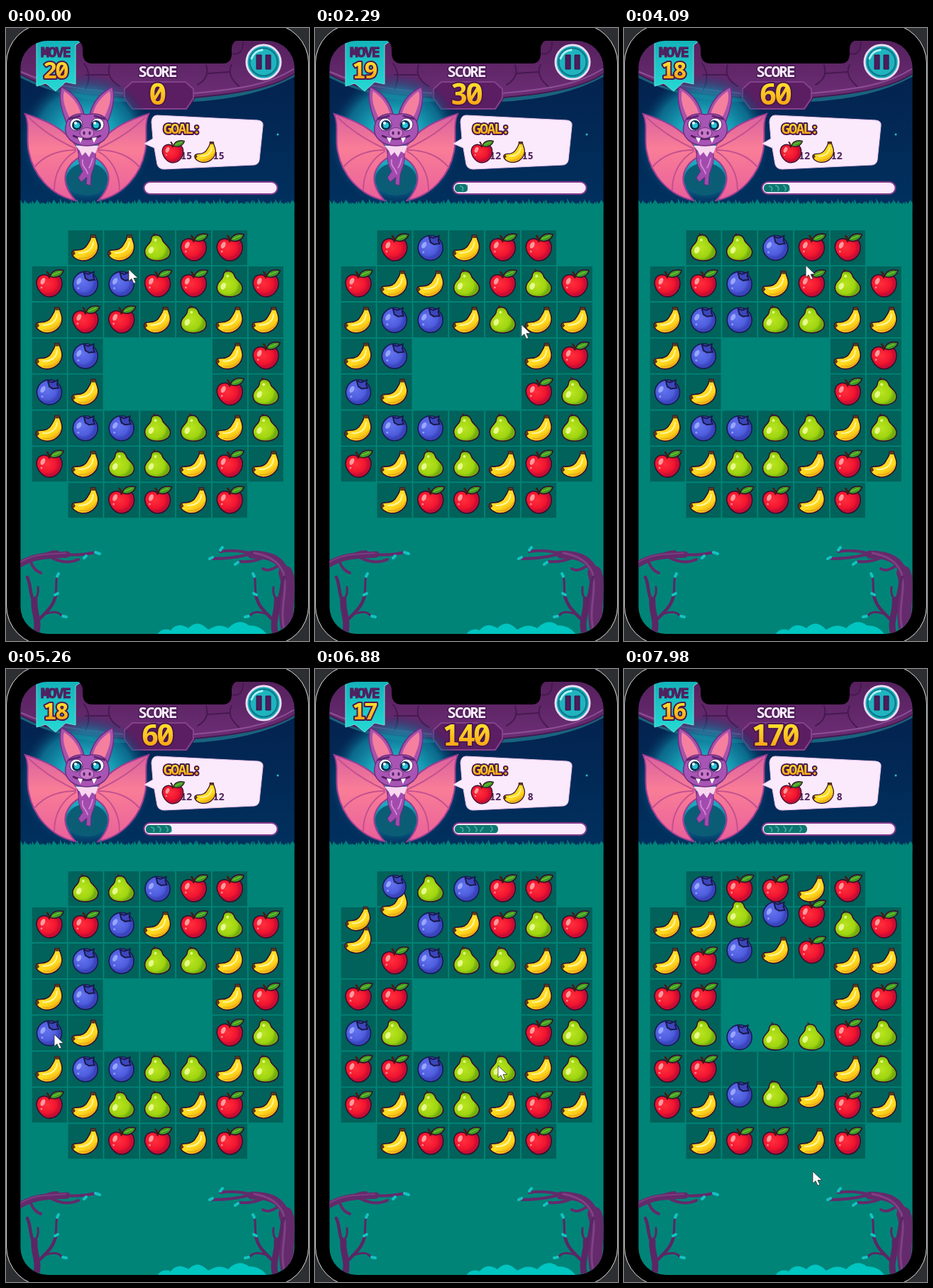
These frames come from a looping animation (427 px wide and 864 px high, 8000 ms). An HTML page:

```html
<!DOCTYPE html>
<html lang="en">
<head>
<meta charset="utf-8">
<title>Fruit match</title>
<style>
html, body { margin: 0; width: 100%; height: 100%; overflow: hidden; background: #2d2e31 }
svg { display: block; width: 100vw; height: 100vh }
text { font-family: "Noto Sans Mono", "DejaVu Sans Mono", monospace; font-weight: 900; letter-spacing: -.09em; paint-order: stroke; stroke-linejoin: round }
.mid { text-anchor: middle }
.num { fill: url(#gold); stroke: #4a174f; stroke-width: 4 }
.count { font-size: 14px; font-weight: 800; letter-spacing: -.03em; fill: #4c2458; text-anchor: end }
.fruit { stroke: #35102f; stroke-width: 1.6; stroke-linejoin: round }
.line { fill: none; stroke-linecap: round; stroke-linejoin: round }
</style>
</head>
<body>
<svg viewBox="0 0 427 864" preserveAspectRatio="none">
<defs>
  <linearGradient id="gold" x2="0" y2="1"><stop offset=".3" stop-color="#ffdc2b"/><stop offset=".85" stop-color="#f9a012"/></linearGradient>
  <linearGradient id="sky" x2="0" y2="1"><stop stop-color="#051f4b"/><stop offset="1" stop-color="#00315f"/></linearGradient>
  <linearGradient id="rock" x2="0" y2="1"><stop stop-color="#55205c"/><stop offset="1" stop-color="#71307a"/></linearGradient>
  <linearGradient id="skin" x2="0" y2="1"><stop stop-color="#d9619f"/><stop offset=".4" stop-color="#f97d97"/><stop offset="1" stop-color="#e9609a"/></linearGradient>
  <linearGradient id="flag" x2="0" y2="1"><stop stop-color="#13b2b9"/><stop offset="1" stop-color="#25d9d4"/></linearGradient>
  <radialGradient id="glow"><stop offset=".4" stop-color="#1aa9bd"/><stop offset=".75" stop-color="#0f809f" stop-opacity=".75"/><stop offset="1" stop-color="#033865" stop-opacity="0"/></radialGradient>
  <radialGradient id="red" cx=".4" cy=".4"><stop stop-color="#ff2f3c"/><stop offset=".75" stop-color="#f1142f"/><stop offset="1" stop-color="#c80d33"/></radialGradient>
  <radialGradient id="blue" cx=".4" cy=".4"><stop stop-color="#6373ee"/><stop offset=".75" stop-color="#4e5ddd"/><stop offset="1" stop-color="#3a45bd"/></radialGradient>
  <radialGradient id="green" cx=".4" cy=".5"><stop stop-color="#b9e420"/><stop offset=".75" stop-color="#a0d510"/><stop offset="1" stop-color="#73ad0e"/></radialGradient>
  <linearGradient id="yellow" x2=".6" y2="1"><stop stop-color="#ffe436"/><stop offset=".75" stop-color="#ffd91e"/><stop offset="1" stop-color="#efab12"/></linearGradient>

  <g id="A">
    <path class="fruit" fill="url(#red)" d="M0-10C5-16 18-14 18-1C18 10 9 18 1 18C-8 19-17 9-18-1C-18-13-6-16 0-10Z"/>
    <path class="line" stroke="#4a1a12" stroke-width="2.5" d="M0-9Q0-14-3-17"/>
    <path class="fruit" fill="#3f9c22" d="M1-11C4-20 13-21 20-19C18-11 8-7 1-11Z"/>
    <path class="line" stroke="#8ad540" d="M5-13L15-17"/>
    <ellipse cx="-9" cy="-4" rx="3" ry="5" fill="#ff9a9c" transform="rotate(25 -9 -4)"/>
    <circle cx="-11" cy="5" r="1.5" fill="#ff8088"/>
  </g>
  <g id="B">
    <path class="fruit" fill="url(#yellow)" d="M8-18L14-18C14-13 18-9 18-2C18 10 7 19-5 18C-13 17-19 12-19 7C-18 3-15 3-12 3C-5 3 0 1 3-5C5-9 9-13 8-18Z"/>
    <path fill="#5d3a12" d="M8-18L14-18L14-14L9-14ZM-19 7L-16 4L-14 8L-17 11Z"/>
    <path class="line" stroke="#fff6a0" stroke-width="2" d="M11-8C10 2 3 7-9 7"/>
    <path class="line" stroke="#e0a014" d="M16 2C12 12 2 16-9 14"/>
  </g>
  <g id="P">
    <path class="line" stroke="#4a2a12" stroke-width="2.5" d="M-2-16L-5-20"/>
    <path class="fruit" fill="url(#green)" d="M-7-17C-1-20 5-18 7-11C9-5 18-3 18 6C18 14 9 18 0 18C-10 18-18 14-18 5C-18-4-9-6-9-12C-9-15-8-16-7-17Z"/>
    <ellipse cx="-9" cy="3" rx="3.5" ry="5" fill="#e8f98c" transform="rotate(25 -9 3)"/>
    <circle cx="-3" cy="-11" r="2" fill="#e0f780"/>
  </g>
  <g id="U">
    <circle class="fruit" r="17.5" fill="url(#blue)" style="stroke:#191a52"/>
    <path fill="#3c46bb" stroke="#181a4a" stroke-width="2" d="M-2-16L4-14L12-17L11-11L13-6L5-5L0-8Z"/>
    <ellipse cx="-9" cy="-4" rx="3" ry="5" fill="#98a6ff" transform="rotate(30 -9 -4)"/>
    <circle cx="-10" cy="6" r="1.5" fill="#8d9cff"/>
  </g>

  <g id="half">
    <path fill="url(#skin)" stroke="#a03d93" stroke-width="2" d="M100 168C84 142 56 130 27 121C34 136 28 156 32 174C38 206 62 236 98 243C84 228 80 212 86 200C90 192 96 186 104 182Z"/>
    <path class="line" stroke="#c4508f" stroke-width="2" d="M98 170C72 158 48 142 32 126M98 172C70 172 52 182 40 196M98 174C80 184 68 204 68 228"/>
    <path fill="#a852ab" stroke="#6f2c80" stroke-width="1.5" d="M87 138C77 114 74 98 78 83C95 91 107 106 111 126Z"/>
    <path fill="#f57f9f" d="M90 127C82 111 79 99 82 89C95 98 103 109 106 123Z"/>
  </g>
  <g id="twig" class="line" stroke="#5c2665">
    <path stroke-width="9" d="M40 860C50 838 38 824 40 806"/>
    <path stroke-width="4.5" d="M44 836C58 822 66 816 70 800M40 810C32 796 36 786 30 774"/>
    <path stroke-width="3" d="M67 808C74 792 68 782 73 770M54 826C62 824 72 820 78 828M40 806C46 800 46 794 45 788"/>
    <path stroke="#13c3c1" stroke-width="4" d="M72 773L74 769M80 829L85 830M69 799L73 797"/>
  </g>
  <clipPath id="screen"><rect x="20.500" y="18" width="386" height="836" rx="38"/></clipPath>
</defs>

<rect width="427" height="864" fill="#2d2e31"/>
<rect x=".5" y="-6" width="426" height="876" rx="56" stroke="#e0e0e0"/>
<g clip-path="url(#screen)">
  <rect x="20" y="17" width="388" height="240" fill="url(#sky)"/>
  <path fill="#2a97a4" opacity=".55" d="M20 70Q90 105 170 104H262Q350 100 408 68V60H20Z"/>
  <path fill="url(#rock)" stroke="#431a50" stroke-width="2" d="M18 16H410V62C380 84 330 92 266 98L255 114H178L166 98C105 94 60 88 18 64Z"/>
  <path class="line" stroke="#8d4e95" stroke-width="2" d="M22 62C70 84 110 86 164 92M264 92C330 86 370 80 405 58"/>
  <path class="line" stroke="#47194f" stroke-width="2" d="M110 50Q122 66 112 86M146 52Q140 70 160 82M270 80Q288 70 282 52M318 52Q310 66 328 82M318 36Q334 40 334 20M112 66L144 66M284 64L314 62"/>
  <path fill="#5b1e62" stroke="#84418b" stroke-width="2" d="M178 76H253L264 86V99L254 114H178L167 99V86Z"/>
  <circle cx="383" cy="150" r="1.500" fill="#35b6c8"/>

  <circle cx="113" cy="158" r="94" fill="url(#glow)"/>
  <ellipse cx="114" cy="213" rx="29" ry="23" fill="#0b5d76"/>
  <use href="#half"/>
  <use href="#half" transform="translate(228 0) scale(-1 1)"/>
  <path fill="#a24bae" stroke="#6f2c80" d="M103 172Q114 166 125 172C129 190 122 198 120 207L119 222L113 220L114 210L106 217L102 211L108 202C102 192 101 182 103 172Z"/>
  <path class="line" stroke="#d283d0" stroke-width="2" d="M108 186C106 195 113 197 115 205M122 184Q120 193 117 197"/>
  <path fill="#f8d7ef" d="M98 166L130 166L126 177L121 174L117 182L112 175L107 180L104 173Z"/>
  <path fill="#a854b4" stroke="#6f2c80" stroke-width="1.500" d="M84 139C86 122 102 119 114 122C128 119 143 122 145 139C148 154 134 166 114 166C95 166 81 154 84 139Z"/>
  <g stroke="#55206b"><circle cx="99" cy="136" r="9" fill="#fff"/><circle cx="129" cy="136" r="9" fill="#fff"/></g>
  <g stroke="#102f57" stroke-width="3" fill="#25c5d4"><circle cx="100" cy="137" r="5.500"/><circle cx="127" cy="137" r="5.500"/></g>
  <g fill="#fff"><circle cx="98" cy="134" r="2"/><circle cx="125" cy="134" r="2"/></g>
  <path class="line" stroke="#602570" stroke-width="3" d="M89 128L104 124M125 124L139 128"/>
  <path class="line" stroke="#501b5d" stroke-width="2.500" d="M95 152Q114 161 133 152"/>
  <path fill="#fff" d="M101 154L105 162L108 155ZM121 155L124 162L128 154Z"/>
  <ellipse cx="114" cy="148" rx="10" ry="7.500" fill="#c77ac9" stroke="#733184"/>
  <path class="line" stroke="#541f62" stroke-width="3" d="M110 147V149M118 147V149"/>

  <path id="grass" fill="#008478"/>
  <path id="cells" fill="#00625a"/>

  <path fill="url(#flag)" stroke="#6ee0dc" d="M43 16H109L98 24V79L84 76L70 89L56 78L43 82Z"/>
  <text class="mid" x="69.500" y="41" font-size="20" fill="#50205f" stroke="#50205f">MOVE</text>
  <text class="mid num" id="moves" x="69" y="71" font-size="33"></text>
  <text class="mid" x="213" y="69" font-size="21" fill="#fbecff" stroke="#491953" stroke-width="3">SCORE</text>
  <text class="mid num" id="score" x="212" y="108" font-size="42"></text>

  <circle cx="363" cy="48" r="24" fill="#14a9b6" stroke="#eadcf5" stroke-width="3"/>
  <circle cx="363" cy="48" r="19.500" fill="#1fb4bf" stroke="#0c7486" stroke-width="2"/>
  <path class="line" stroke="#a5f3f3" stroke-width="3" d="M346 43Q350 32 361 31"/>
  <path fill="#4d1d5d" stroke="#321044" d="M353 38H360V58H353ZM366 38H373V58H366Z"/>

  <path fill="#fbe9fc" stroke="#e3bfe8" d="M213 123L355 130Q363 131 362 138L357 186Q356 192 350 193L223 199Q215 199 213 192L209 169L195 163L207 156L205 132Q206 123 213 123Z"/>
  <text x="222" y="149" font-size="20" class="num">GOAL:</text>
  <text class="count" id="apples" x="262" y="185"></text>
  <text class="count" id="bananas" x="307.500" y="185"></text>
  <use href="#A" transform="translate(235 175) scale(.82)"/>
  <use href="#B" transform="translate(281 175) scale(.8)"/>

  <rect x="194.500" y="217" width="188" height="17" rx="8.500" fill="#fbe9fc" stroke="#843a8b" stroke-width="2"/>
  <svg id="bar" x="197" y="220" height="11.500">
    <rect id="fill" height="11.500" rx="5" fill="#0d756f"/>
    <path class="line" stroke="#38a79b" stroke-width="2" d="M8 3Q13 4 11 9M17 2Q23 5 20 9M28 2Q33 6 30 9M40 3L36 9M51 2Q55 5 51 9"/>
  </svg>

  <g class="line" stroke="#642a6b">
    <path stroke-width="9" d="M16 758C40 742 60 744 86 742"/>
    <path stroke-width="4" d="M80 742Q104 744 126 739M60 744Q82 758 102 749M46 746Q62 738 72 738M34 750Q38 764 49 768"/>
    <path stroke="#7b3d80" stroke-width="2" d="M20 753C40 740 60 742 84 740"/>
    <path stroke-width="20" d="M402 862C386 824 404 792 394 768"/>
    <path stroke-width="11" d="M397 780C392 748 372 742 346 742"/>
    <path stroke-width="4" d="M350 742Q324 734 302 738M342 742Q318 748 292 748M366 744Q350 754 330 752M386 756Q370 768 362 762"/>
    <path stroke="#7f4183" stroke-width="3" d="M393 850C384 820 398 795 391 768C384 752 372 744 350 740"/>
  </g>
  <use href="#twig"/>
  <use href="#twig" transform="translate(422 0) scale(-1 1)"/>
  <path class="line" stroke="#13c3c1" stroke-width="4" d="M126 739L132 741M110 747L113 744M302 736L305 732M287 748L291 746M327 753L323 756"/>
  <path fill="#00c5c1" d="M212 856Q220 844 232 849Q242 836 257 846Q270 832 285 848Q300 838 313 846Q328 831 342 842Q360 842 368 856Z"/>
  <g id="pieces"></g>
</g>
<path d="M96 16Q108 18 108 30V36Q109 50 122 50H305Q318 50 318 36V30Q318 18 330 16Z"/>
<path id="cursor" fill="#fff" stroke="#333" stroke-width=".8" d="M0 0V17L4 13.500L7 20L10 19L7 12.500H13Z"/>
</svg>

<script>
const $ = id => document.getElementById(id);
const LOOP = 8000, STEP = 250, POP = 400, FALL = 660;
const layout = ['-BBPAA-', 'AUUAAPA', 'BAABPBB', 'BU...BA', 'UB...AP', 'BUUPPBP', 'ABPPBAB', '-BAABA-'];
// Swapped cells are [row, column]; drops list the new fruit for each column.
const plays = [
  { at: 850, a: [1, 3], b: [2, 3], drops: { 1: 'A', 2: 'U', 3: 'B' } },
  { at: 2900, a: [2, 3], b: [1, 3], drops: { 1: 'P', 2: 'P', 3: 'U' } },
  { at: 5365, a: [4, 0], b: [4, 1], drops: { 0: 'UABB', 1: 'AABU' } },
  { at: 7145, a: [5, 4], b: [6, 4], drops: { 2: 'A', 3: 'A', 4: 'B' } }
];
const path = [[0, 173, 340], [40, 173, 340], [400, 250, 357], [740, 222, 372], [860, 222, 372],
  [1100, 222, 425], [1640, 250, 430], [1760, 305, 424], [2010, 305, 424], [2290, 291, 418],
  [2780, 225, 418], [2880, 225, 416], [3100, 222, 366], [3600, 250, 345], [4090, 256, 334],
  [4410, 312, 506], [4800, 230, 570], [5220, 74, 516], [5260, 68, 515], [5340, 68, 515],
  [5560, 118, 520], [6030, 222, 575], [6280, 234, 586], [6550, 250, 595], [6880, 258, 559],
  [7080, 258, 559], [7320, 262, 612], [7700, 266, 708]];

const spot = (r, c) => [61 + 50.85 * c, 310 + 50.85 * r];
const pieces = [], board = [];
const stats = [{ at: 0, moves: 20, score: 0, A: 15, B: 15 }], barKeys = [[0, 0]];

function add(kind, keys) {
  const use = document.createElementNS('http://www.w3.org/2000/svg', 'use');
  use.setAttribute('href', '#' + kind);
  $('pieces').append(use);
  const piece = { kind, keys, use };
  pieces.push(piece);
  return piece;
}

function tween(piece, t, length, pos, scale = 1) {
  piece.keys.push([t, ...piece.keys.at(-1).slice(1)], [t + length, ...pos, scale]);
}

function matches() {
  const found = new Set();
  for (let r = 0; r < 8; r++) for (let c = 0; c < 7; c++)
    for (const [dr, dc] of [[0, 1], [1, 0]]) {
      const run = [0, 1, 2].map(i => [r + dr * i, c + dc * i]);
      const kinds = run.map(([y, x]) => board[y]?.[x]?.kind);
      if (kinds[0] && kinds.every(k => k === kinds[0])) run.forEach(p => found.add(p.join()));
    }
  return [...found].map(s => s.split(',').map(Number));
}

// Drop every piece as far as it goes and let one new piece in at the top.
function settle(c, t, queue) {
  const rows = [...Array(8).keys()].filter(r => /\w/.test(layout[r][c]));
  let free = rows.length - 1;
  for (let i = free; i >= 0; i--) {
    const piece = board[rows[i]][c];
    if (!piece) continue;
    if (free > i) {
      board[rows[i]][c] = null;
      board[rows[free]][c] = piece;
      tween(piece, t, STEP, spot(rows[free], c));
    }
    free--;
  }
  if (free >= 0 && queue.length) {
    const [x, y] = spot(rows[0], c);
    board[rows[0]][c] = add(queue.shift(), [[t, x, y - (rows[0] ? 58 : 20), .5], [t + STEP / 2, x, y, 1]]);
  }
}

function play({ at, a, b, drops }) {
  const [p, q] = [a, b].map(([r, c]) => board[r][c]);
  board[a[0]][a[1]] = q;
  board[b[0]][b[1]] = p;
  tween(p, at, STEP, spot(...b));
  tween(q, at, STEP, spot(...a));

  const stat = { ...stats.at(-1), at: at + POP };
  stat.moves--;
  for (const [r, c] of matches()) {
    const piece = board[r][c];
    tween(piece, at + POP, 220, spot(r, c), 0);
    board[r][c] = null;
    stat.score += 10;
    if (piece.kind in stat) stat[piece.kind]--;
  }
  stats.push(stat);
  barKeys.push([at + POP, barKeys.at(-1)[1]], [at + FALL + 100, (30 - stat.A - stat.B) / 30]);

  for (const c in drops) {
    const queue = [...drops[c]];
    for (let t = at + FALL; queue.length; t += STEP) settle(+c, t, queue);
  }
}

function sample(keys, t) {
  const i = keys.findLastIndex(k => k[0] <= t), [from, to] = [keys[i], keys[i + 1]];
  if (!to) return from.slice(1);
  const f = (t - from[0]) / (to[0] - from[0]);
  return from.slice(1).map((v, j) => v + (to[j + 1] - v) * f);
}

let cellPath = '', grassPath = 'M20 860V248';
layout.forEach((line, r) => {
  board.push([...line].map((kind, c) => {
    if (!/\w/.test(kind)) return null;
    const [x, y] = spot(r, c);
    cellPath += `M${x - 24.3} ${y - 24.8}h49v49h-49Z`;
    return add(kind, [[0, x, y, 1]]);
  }));
});
for (let x = 20, i = 0; x < 408; x += 8, i++)
  grassPath += `L${x} 249L${x + i % 3 - 1} ${240 + i * 5 % 7}L${x + 4} 248L${x + 7} ${242 + i * 3 % 5}`;
$('cells').setAttribute('d', cellPath);
$('grass').setAttribute('d', grassPath + 'L408 248V860Z');
plays.forEach(play);

function draw(now) {
  const t = now % LOOP;
  for (const { keys, use } of pieces) {
    const [x, y, s] = t < keys[0][0] ? [0, 0, 0] : sample(keys, t);
    use.style.display = s > 0 ? '' : 'none';
    use.setAttribute('transform', `translate(${x} ${y}) scale(${s})`);
  }
  const stat = stats.findLast(s => s.at <= t);
  $('moves').textContent = stat.moves;
  $('score').textContent = stat.score;
  $('apples').textContent = stat.A;
  $('bananas').textContent = stat.B;
  const width = 183 * sample(barKeys, t)[0];
  $('bar').setAttribute('width', width);
  $('fill').setAttribute('width', width);
  $('cursor').setAttribute('transform', `translate(${sample(path, t).join(' ')})`);
  requestAnimationFrame(draw);
}
draw(performance.now());
</script>
</body>
</html>
```
